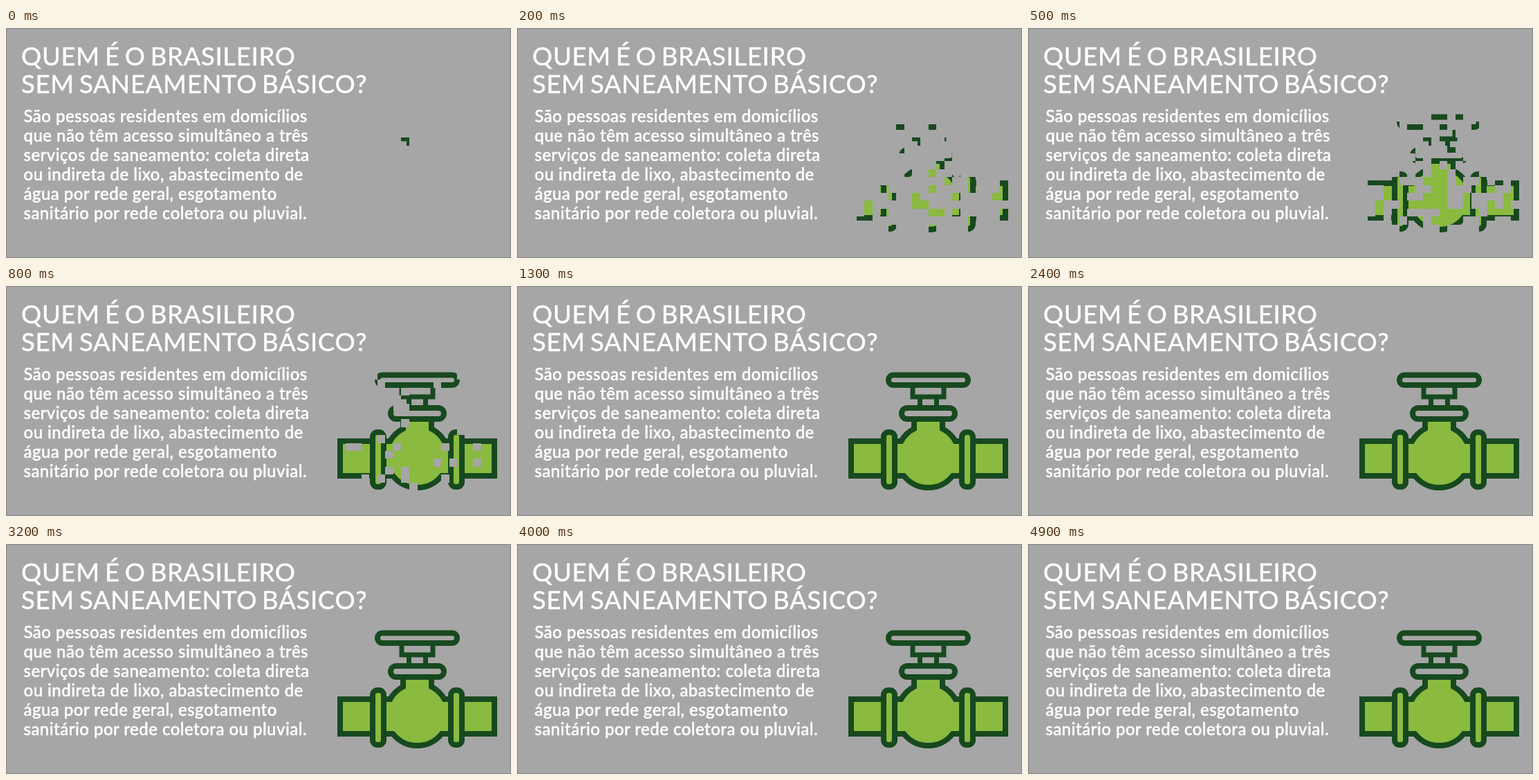
An HTML page that plays this animation: 730x332 px, repeating every 5 s.

```html
<!DOCTYPE html>
<html lang="pt-BR">
<head>
<meta charset="utf-8">
<title>Saneamento básico</title>
<style>
  html, body { margin: 0; width: 100%; height: 100%; overflow: hidden; background: #a6a6a6; }
  svg { display: block; width: 730px; height: 332px; }
  text { fill: #fff; stroke: #fff; stroke-width: .5px; font-family: Lato, "Open Sans", sans-serif; }
  .title { font-size: 36.5px; letter-spacing: .7px; word-spacing: -3px; }
  .body { font-size: 24px; font-weight: 500; letter-spacing: .47px; }
  .valve { fill: #8aba3f; stroke: #17491f; stroke-width: 8; }
  .open { fill: none; }
</style>
</head>
<body>
<svg viewBox="0 0 730 332">
  <defs><clipPath id="clip"><path id="cells" shape-rendering="crispEdges"/></clipPath></defs>
  <rect x=".5" y=".5" width="729" height="331" fill="#a6a6a6" stroke="#858585"/>
  <g class="title">
    <text x="22" y="54">QUEM É O BRASILEIRO</text>
    <text x="22" y="94">SEM SANEAMENTO BÁSICO?</text>
  </g>
  <g class="body">
    <text x="25.5" y="136">São pessoas residentes em domicílios</text>
    <text x="25.5" y="164">que não têm acesso simultâneo a três</text>
    <text x="25.5" y="192">serviços de saneamento: coleta direta</text>
    <text x="25.5" y="220">ou indireta de lixo, abastecimento de</text>
    <text x="25.5" y="248">água por rede geral, esgotamento</text>
    <text x="25.5" y="276">sanitário por rede coletora ou pluvial.</text>
  </g>
  <g clip-path="url(#clip)">
    <g class="valve">
      <path d="M530 224H483V274H530ZM659 224H706V274H659Z"/>
      <path d="M545 224H555.3A45 45 0 0 1 574 206V192H615V206A45 45 0 0 1 633.7 224H644V274H629.8A45 45 0 0 1 559.2 274H545Z"/>
      <rect x="530" y="211" width="16" height="79" rx="7"/>
      <rect x="643" y="211" width="16" height="79" rx="7"/>
      <g class="open">
        <path stroke-width="7" d="M582.5 161V175M606.5 161V175M572 145V160H617V145"/>
        <rect x="556" y="176" width="77" height="16" rx="8"/>
        <rect x="537" y="128.5" width="115" height="14.5" rx="7.2"/>
      </g>
    </g>
  </g>
</svg>
<script>
  const COLS = 20, ROWS = 15, X = 479, Y = 124, W = 231, H = 171;
  const LOOP = 5000, STEP = 100, FULL = 10;
  const FIRST = 3 * COLS + 8;
  const path = document.getElementById('cells');

  let seed = 11;
  const rand = () => (seed = (seed * 16807) % 2147483647) / 2147483647;

  // step at which each cell appears; the handwheel rows tend to come later
  const start = Array.from({ length: COLS * ROWS }, (_, i) => {
    const u = rand() ** (i < 2 * COLS ? 0.5 : 1);
    return i === FIRST ? 0 : 1 + Math.floor(u * (FULL - 1));
  });

  const edge = (from, size, n, i) => Math.round(from + size * i / n);
  function cell(i) {
    const c = i % COLS, r = Math.floor(i / COLS);
    const x = edge(X, W, COLS, c), y = edge(Y, H, ROWS, r);
    return `M${x} ${y}H${edge(X, W, COLS, c + 1)}V${edge(Y, H, ROWS, r + 1)}H${x}Z`;
  }

  let shown = -1;
  function draw(step) {
    if (step === shown) return;
    shown = step;
    path.setAttribute('d', step >= FULL
      ? `M${X} ${Y}h${W}v${H}h${-W}Z`
      : start.map((s, i) => s <= step ? cell(i) : '').join(''));
  }

  const t0 = performance.now();
  function tick() {
    const t = (performance.now() - t0) % LOOP;
    draw(Math.min(FULL, Math.floor(t / STEP)));
    requestAnimationFrame(tick);
  }
  tick();
</script>
</body>
</html>
```
